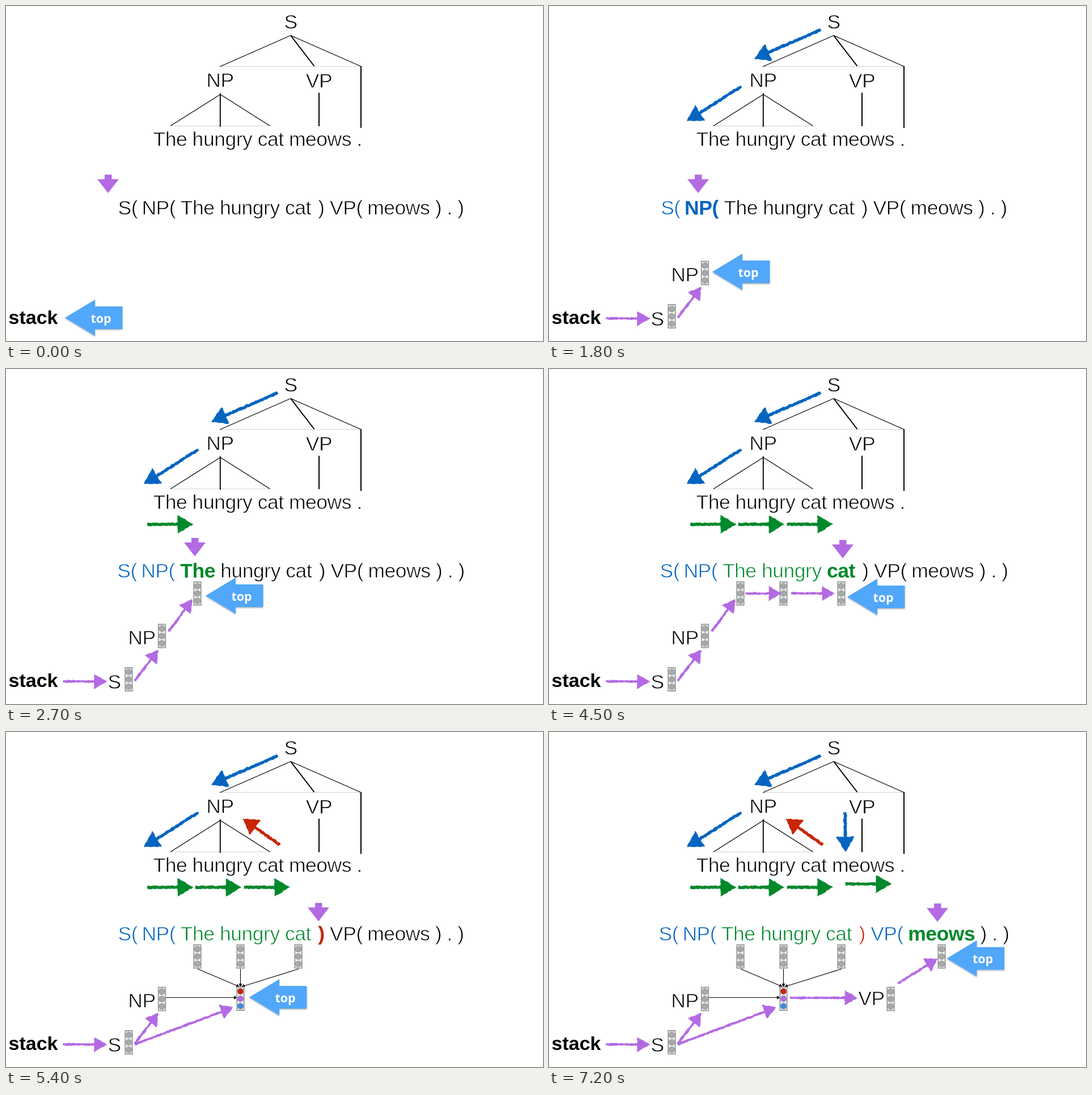
These frames come from a looping animation (947 px wide and 591 px high, 8000 ms). An HTML page:

```html
<!DOCTYPE html>
<html lang="en">
<head>
<meta charset="utf-8">
<title>Parsing with a stack</title>
<style>
html, body { margin: 0; width: 100%; height: 100%; overflow: hidden; background: #fff; }
svg { display: block; width: 100%; height: 100%; }
text { white-space: pre; font-family: "Liberation Sans", Arial, sans-serif; }
/* a white outline trims regular letters to a light weight */
.light { font-size: 35.5px; letter-spacing: -.48px; stroke: #fff; stroke-width: .8px; }
.bold { font-weight: 700; stroke: none; }
.stack { font-size: 34px; font-weight: 700; }
.top { font: 700 21.5px "Open Sans", sans-serif; fill: #fff; }
</style>
</head>
<body>
<svg id="stage" viewBox="0 0 947 591">
  <defs>
    <filter id="shadow" x="-10%" y="-10%" width="120%" height="130%">
      <feDropShadow dx="0" dy="1.5" stdDeviation="1" flood-opacity=".32"/>
    </filter>
  </defs>
</svg>
<script>
const STEP = 900, LOOP = 8000;
const BLUE = '#0365c0', GREEN = '#00882b', RED = '#c82506', PURPLE = '#b36ae2', SKY = '#51a7f9';
const stage = document.getElementById('stage');
const timed = [];

function add(tag, attrs, parent = stage, label = '') {
  const el = document.createElementNS('http://www.w3.org/2000/svg', tag);
  for (const key in attrs) el.setAttribute(key, attrs[key]);
  el.textContent = label;
  parent.appendChild(el);
  return el;
}

// Shown from step `from` up to, but not including, step `to`
function during(from, to = 99) {
  const el = add('g', {});
  timed.push({ el, from, to });
  return el;
}

function line(x1, y1, x2, y2, width = 1.2, stroke = '#000', parent = stage) {
  add('line', { x1, y1, x2, y2, stroke, 'stroke-width': width }, parent);
}

function label(x, y, words, anchor = 'middle', parent = stage) {
  return add('text', { x, y, class: 'light', 'text-anchor': anchor }, parent, words);
}

let seed = 7;
function jitter(size) {
  seed = (seed * 16807) % 2147483647;
  return (seed / 2147483647 - .5) * 2 * size;
}

// Rough chalk stroke with a solid triangular head
function chalk(parent, color, x1, y1, x2, y2, head, half, width) {
  const len = Math.hypot(x2 - x1, y2 - y1), ux = (x2 - x1) / len, uy = (y2 - y1) / len;
  const at = (d, side) => {
    const a = d + jitter(.6), s = side + jitter(.8);
    return (x1 + ux * a - uy * s).toFixed(1) + ',' + (y1 + uy * a + ux * s).toFixed(1);
  };
  const base = len - head, up = [], down = [];
  for (let d = 0; d < base + 3; d += 2.5) {
    up.push(at(d, -width / 2));
    down.unshift(at(d, width / 2));
  }
  add('polygon', { points: up.concat(down).join(' '), fill: color }, parent);
  const tri = [], corners = [[base, -half], [len, 0], [base, half]];
  corners.forEach(([d, s], i) => {
    const [d2, s2] = corners[(i + 1) % 3];
    for (let k = 0; k < 1; k += .1) tri.push(at(d + (d2 - d) * k, s + (s2 - s) * k));
  });
  add('polygon', { points: tri.join(' '), fill: color, stroke: color, 'stroke-width': 1 }, parent);
}

const walk = (from, color, ...ends) => chalk(during(from), color, ...ends, 26, 15.5, 5.5);
const link = (from, to, ...ends) => chalk(during(from, to), PURPLE, ...ends, 21, 12.5, 4.2);

function cell(parent, x, y, colors = ['#a6aaa9', '#a6aaa9', '#a6aaa9']) {
  add('rect', { x: x - 6.2, y: y - 20.5, width: 12.4, height: 41, fill: '#f2f3f3', stroke: '#9b9f9e', 'stroke-width': 2 }, parent);
  colors.forEach((fill, i) =>
    add('circle', { cx: x, cy: y + (i - 1) * 13, r: 5.3, fill, stroke: '#85888d', 'stroke-width': .8 }, parent));
}

function thinArrow(parent, x1, y1, x2, y2) {
  const turn = Math.atan2(y2 - y1, x2 - x1) * 180 / Math.PI;
  line(x1, y1, x2, y2, 1.1, '#000', parent);
  add('path', { d: 'M0 0L-6 -3V3Z', transform: `translate(${x2} ${y2}) rotate(${turn})` }, parent);
}

// Tree
line(377, 106.5, 626, 106.5, 1, '#d2d2d2');
line(290, 211.5, 465, 211.5, 1, '#d2d2d2');
line(502, 52, 377, 107);
line(502, 52, 543.5, 106, 2);
line(502, 52, 627, 107);
line(626, 106, 626, 215, 2);
line(378, 156, 290, 211.5);
line(378, 156, 465.5, 211.5);
line(377.8, 154, 377.8, 213, 1.9);
line(552, 153, 552, 212, 2);
label(502, 39.5, 'S');
label(377.5, 143, 'NP');
label(552, 143.5, 'VP');
label(259.5, 247, 'The hungry cat meows .', 'start');

// Bracketed sentence
const tokens = [
  ['S( ', BLUE, 0], ['NP( ', BLUE, -2], ['The ', GREEN, 0], ['hungry ', GREEN, 0], ['cat ', GREEN, 0],
  [') ', RED, 3], ['VP( ', BLUE, 0], ['meows ', GREEN, -1], [') ', RED, 0], ['. ', GREEN, 0], [')', RED, 0]
];
const sentence = label(502.5, 368, '');
const words = tokens.map(([word, , dx]) => add('tspan', { dx }, sentence, word));

// Walk through the tree
walk(1, BLUE, 479, 42, 363, 92.5);
walk(2, BLUE, 339, 142, 244, 202.5);
walk(3, GREEN, 249, 274, 329, 274);
walk(4, GREEN, 334, 274, 414, 274);
walk(5, GREEN, 420, 274, 500, 274);
walk(6, RED, 483, 199, 418, 153.5);
walk(7, BLUE, 522, 142, 523, 211);
walk(8, GREEN, 523, 268, 603, 268);

// Stack
add('text', { x: 4.5, y: 560.5, class: 'stack' }, stage, 'stack');
function node(from, x, y, name, tx, ty) {
  const g = during(from);
  if (name) label(tx, ty, name, 'middle', g);
  cell(g, x, y);
}
node(1, 216.5, 547.5, 'S', 191, 563.5);
node(2, 275, 471, 'NP', 239.5, 486);
node(3, 337.5, 396);
node(4, 413.5, 396);
node(5, 515.5, 396);
node(7, 602.5, 471, 'VP', 568.5, 482);
node(8, 692.5, 396);

const merged = during(6);
thinArrow(merged, 338, 418, 412, 449.5);
thinArrow(merged, 413.5, 418, 413.5, 450);
thinArrow(merged, 516, 418, 415, 449.5);
thinArrow(merged, 282, 468.5, 408, 468.5);
cell(merged, 413.5, 470.5, [RED, PURPLE, '#3a8fe0']);

link(1, 99, 100, 551, 177, 551.5);
link(2, 99, 227, 550, 268, 496);
link(3, 6, 287, 463, 328, 407);
link(4, 6, 346, 396, 409, 396);
link(5, 6, 427, 396, 503, 396);
link(6, 99, 227, 551, 400, 486);
link(7, 99, 425, 469, 543, 469);
link(8, 99, 615, 444, 685, 400);

// Pointers, one position per step
const pointer = add('g', {});
add('path', { d: 'M0 0L53 -32V-20H101.5V20H53V32Z', fill: SKY, filter: 'url(#shadow)' }, pointer);
add('text', { x: 63.5, y: 8.5, class: 'top', 'text-anchor': 'middle' }, pointer, 'top');
const marker = add('path', { d: 'M-6 0H6.5V8H19L0 32.5L-19 8H-6Z', fill: PURPLE });

const pointerAt = [[104, 550], [229, 548], [288, 469], [352, 400], [431, 400.5], [526, 402], [429, 468], [616, 469], [701.5, 399.5]];
const markerAt = [[180, 297.5], [213, 297.5], [263, 297.5], [333, 298], [426.5, 300.5], [518, 301.5], [551, 301.5], [597, 302], [685, 302.5]];

function show(step) {
  timed.forEach(({ el, from, to }) => el.setAttribute('display', step >= from && step < to ? 'inline' : 'none'));
  words.forEach((el, i) => {
    el.setAttribute('fill', i < step ? tokens[i][1] : '#000');
    el.setAttribute('class', i === step - 1 ? 'bold' : '');
  });
  pointer.setAttribute('transform', `translate(${pointerAt[step]})`);
  marker.setAttribute('transform', `translate(${markerAt[step]})`);
}

let shown = 0;
const start = performance.now();
function tick() {
  const step = Math.floor((performance.now() - start) % LOOP / STEP);
  if (step !== shown) show(shown = step);
  requestAnimationFrame(tick);
}
show(0);
tick();
</script>
</body>
</html>
```
